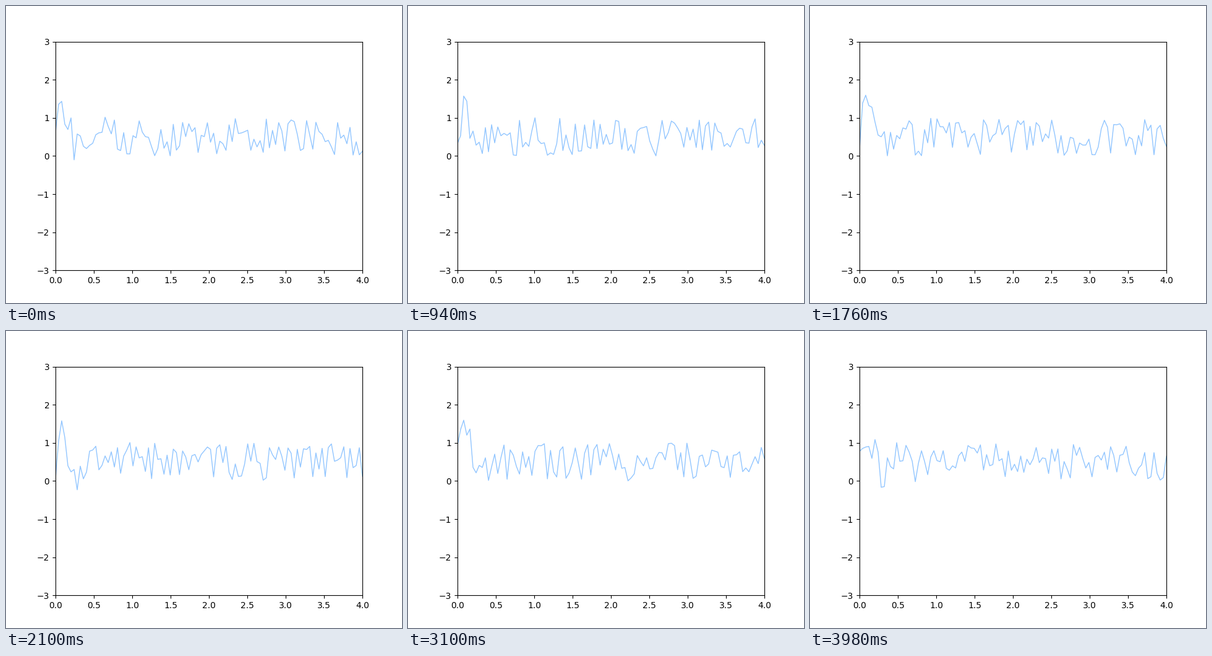
A matplotlib script for the animation above (4 s loop, 640 by 480 pixels).

```python
import matplotlib.pyplot as plt
import numpy as np
from matplotlib.animation import FuncAnimation

FRAMES = 200
INTERVAL = 20  # ms
DECAY = 4.0
OMEGA = 4.5 * np.pi

x = np.linspace(0, 4, 100)
pulse = np.exp(-DECAY * x) * np.sin(OMEGA * x)
noise = np.random.default_rng(7).random((FRAMES, x.size))

fig = plt.figure(figsize=(6.4, 4.8), dpi=100)
ax = fig.add_subplot(xlim=(0, 4), ylim=(-3, 3))
line, = ax.plot([], [], color="#92c6ff", lw=1)


def update(i):
    """Show the damped pulse under fresh uniform noise."""
    line.set_data(x, pulse + noise[i])
    return line,


anim = FuncAnimation(fig, update, frames=FRAMES, interval=INTERVAL,
                     repeat=True, repeat_delay=0)
plt.show()
```
